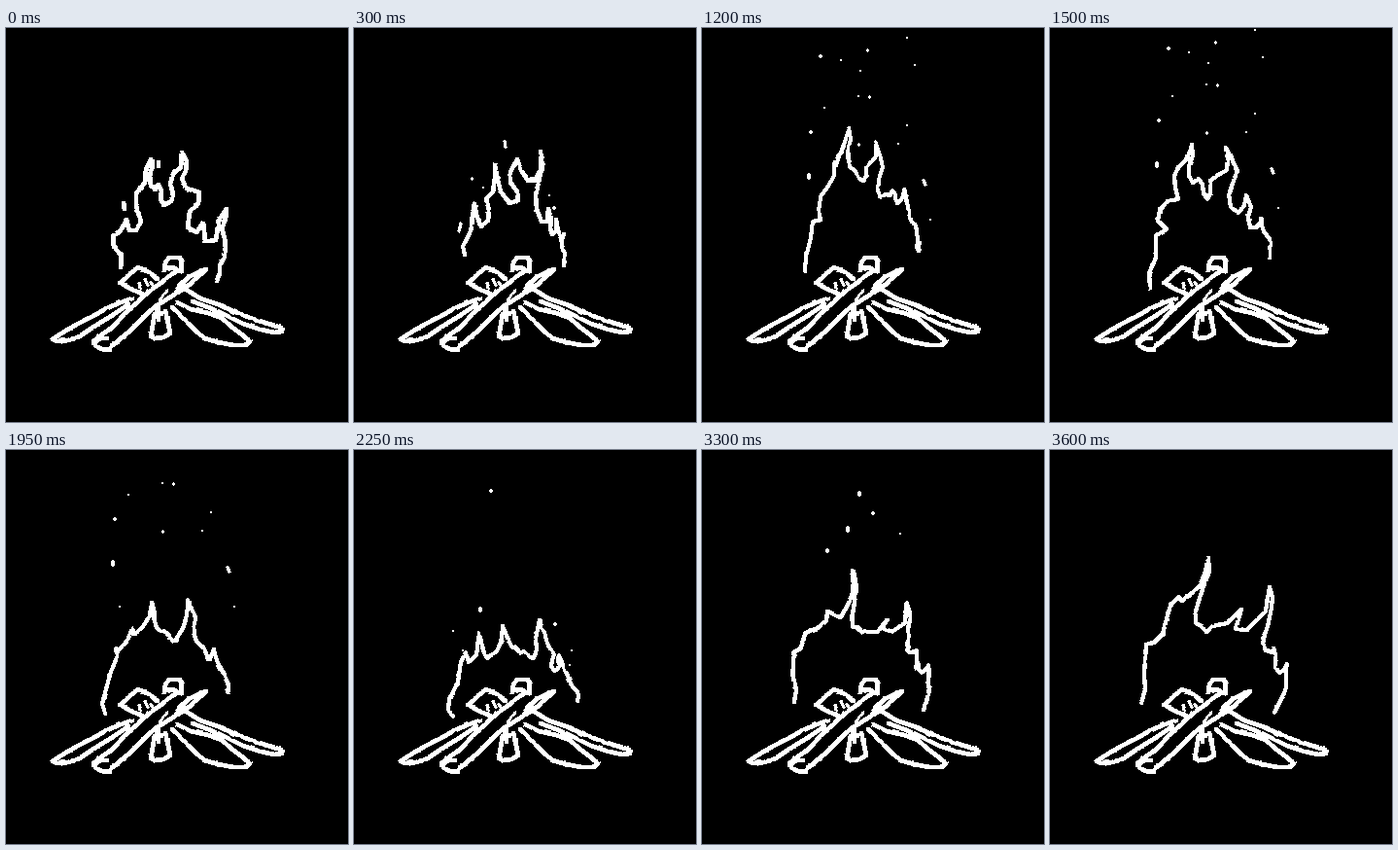
Write an HTML page without scripts that moves like this. It is 352x405 px and loops after 3.75 s.

```html
<!DOCTYPE html>
<html lang="en">
<head>
<meta charset="utf-8">
<title>Campfire</title>
<style>
html, body { margin: 0; width: 100%; height: 100%; overflow: hidden; background: #000; }
svg { display: block; width: 100%; height: 100%; }
path {
  fill: none; stroke: #fff; stroke-width: 4.8;
  stroke-linecap: round; stroke-linejoin: round; shape-rendering: crispEdges;
}
.thin { stroke-width: 3.2; }

/* 25 drawings of 150 ms each: one drawing is 4% of the loop */
.flame { animation: flame 3750ms infinite; }
.sparks { visibility: hidden; animation: 3750ms step-end infinite; }
.s0 { animation-name: s0; }
.s1 { animation-name: s1; }
.s2 { animation-name: s2; }
.s3 { animation-name: s3; }
.s3b { animation-name: s3b; }
.s4 { animation-name: s4; }
.s5 { animation-name: s5; }
.s6 { animation-name: s6; }

/* Each pose: base to first tip, second tip, third tip, right base */
@keyframes flame {
  0% {
    animation-timing-function: steps(2); stroke-width: 4.8px;
    d: path("M118,246 119,234 111,225 110,214 118,208 124,198 127,208 135,208 139,199 134,183 134,170 143,159 144,146 149,135 151,141 148,152 149,162 154,166 157,161 160,168 159,176 163,182 170,178 172,170 169,160 172,150 180,143 181,128 186,137 185,147 181,155 186,165 199,169 198,180 189,189 187,205 196,210 203,200 205,219 216,218 219,198 227,186 226,196 222,206 225,216 226,226 224,237 220,244 220,252 217,260");
  }
  8% {
    animation-timing-function: steps(4); stroke-width: 4.6px;
    d: path("M114,233 112,225 118,213 121,205 122,192 124,181 127,196 131,204 138,198 139,187 136,176 143,168 145,154 145,141 148,156 151,168 156,175 161,180 169,177 168,168 161,159 161,148 168,135 172,146 179,157 187,156 192,145 192,127 194,144 190,158 187,172 188,186 193,199 199,199 200,186 203,196 202,206 204,212 208,209 208,197 210,208 213,218 216,212 214,217 214,222 215,228 217,232 217,236 217,239 216,242 216,244");
  }
  24% {
    animation-timing-function: steps(4); stroke-width: 3.9px;
    d: path("M109,234 112,218 114,200 119,185 124,188 129,178 132,158 137,150 139,130 144,112 148,131 151,118 153,100 156,86 159,98 158,108 158,118 158,128 160,136 163,141 168,142 171,138 173,133 174,128 175,124 175,120 176,116 176,112 178,124 179,138 176,153 178,162 181,164 184,152 187,163 190,162 190,157 194,158 197,155 198,149 198,143 199,136 203,150 205,163 205,178 208,186 213,182 216,193 219,206 219,222");
  }
  40% {
    animation-timing-function: steps(5); stroke-width: 4.3px;
    d: path("M103,267 102,252 109,236 109,213 120,207 111,198 113,187 121,178 132,176 129,164 128,152 132,143 141,135 146,120 147,131 143,142 143,152 147,159 153,155 157,161 158,170 162,176 165,170 165,157 173,151 182,146 183,135 181,123 187,134 193,147 188,159 184,172 186,184 194,190 200,182 202,172 207,184 204,194 206,205 212,205 216,201 218,196 218,203 220,209 223,213 226,217 227,222 226,227 226,232 226,236");
  }
  60% {
    animation-timing-function: steps(4); stroke-width: 4.2px;
    d: path("M102,274 97,267 98,256 107,239 110,218 115,208 118,218 126,211 129,188 133,206 137,214 147,207 152,195 153,181 156,188 159,196 163,203 166,203 169,207 172,208 175,207 178,210 181,213 185,214 188,205 187,194 189,184 191,175 193,181 196,188 198,195 200,201 203,206 206,210 204,216 203,222 206,227 209,226 211,222 210,218 210,214 211,211 214,218 217,226 220,232 223,240 226,245 230,248 231,253 230,258");
  }
  76% {
    animation-timing-function: steps(5); stroke-width: 4.7px;
    d: path("M96,258 96,247 88,234 88,220 94,212 92,187 101,204 111,218 122,212 119,182 137,210 144,190 150,175 145,145 151,155 157,164 160,172 161,180 163,187 167,184 171,188 173,196 179,200 180,191 177,181 183,190 189,197 187,181 190,187 193,194 191,201 195,207 197,214 200,215 201,211 203,207 205,210 205,216 206,224 210,229 214,226 217,224 219,229 219,235 217,240 220,245 223,250 223,255 224,259 224,263");
  }
  96%, 100% {
    animation-timing-function: step-end; stroke-width: 4.3px;
    d: path("M94,260 98,246 97,230 99,200 107,198 116,189 120,173 124,160 132,151 136,155 146,147 153,141 159,128 163,111 164,125 159,138 154,152 150,166 150,178 156,181 161,187 168,181 182,178 197,164 191,184 203,185 222,165 226,141 229,152 228,162 226,172 224,181 221,190 219,199 222,206 228,208 231,204 232,214 232,223 236,229 241,226 244,220 243,226 243,232 243,239 243,245 240,252 237,258 234,264 231,270");
  }
}

/* Sparks tear off, drift up and go out */
@keyframes s0 {
  0% { visibility: visible; transform: none; }
  4% { transform: translateY(-10px); }
  8% { visibility: hidden; }
}
@keyframes s1 {
  8% { visibility: visible; transform: none; }
  12% { transform: translateY(-22px); }
  16% { visibility: hidden; }
}
@keyframes s2 {
  16% { visibility: visible; transform: translateY(11px); }
  20% { transform: translateY(4px); }
  24% { transform: none; }
  28% { transform: translateY(-30px); }
  32% { visibility: hidden; }
}
@keyframes s3 {
  32% { visibility: visible; transform: translateY(8px); }
  36% { transform: translateY(4px); }
  40% { transform: none; }
  44% { transform: translateY(-4px); }
  48% { visibility: hidden; }
}
@keyframes s3b {
  32% { visibility: visible; transform: translateY(12px); }
  36% { transform: translateY(6px); }
  40% { transform: none; }
  44% { transform: translateY(-8px); }
  48% { transform: translateY(-16px); }
  52% { transform: translateY(-24px); }
  56% { transform: translateY(-30px); }
  60% { visibility: hidden; }
}
@keyframes s4 {
  56% { visibility: visible; transform: translateY(8px); }
  60% { transform: none; }
  64% { visibility: hidden; }
}
@keyframes s5 {
  72% { visibility: visible; transform: translateY(10px); }
  76% { transform: none; }
  80% { transform: translateY(-14px); }
  84% { visibility: hidden; }
}
@keyframes s6 {
  84% { visibility: visible; transform: none; }
  88% { transform: translateY(-18px); }
  92% { transform: translateY(-34px); }
  96% { visibility: hidden; }
}
</style>
</head>
<body>
<svg viewBox="0 0 352 405">
  <defs>
    <filter id="rough" filterUnits="userSpaceOnUse" x="0" y="0" width="352" height="405" color-interpolation-filters="sRGB">
      <feTurbulence type="fractalNoise" baseFrequency=".14" numOctaves="2" seed="4"/>
      <feDisplacementMap in="SourceGraphic" scale="2.5" xChannelSelector="R" yChannelSelector="G"/>
    </filter>
  </defs>

  <g filter="url(#rough)">
    <!-- left log -->
    <path d="M130,278 118,282 104,288 88,297 74,304 60,312 48,320 53,322 64,321 74,318 92,306 110,295 126,284"/>
    <!-- front log -->
    <path d="M104,319 97,319 91,321 92,326 98,330 106,331 110,326 128,311 146,293 154,286 175,273 190,263 206,248 198,251 188,256 178,265M95,318 110,307 124,292 148,270 161,261 172,252 181,250"/>
    <!-- short log and back log -->
    <path d="M156,258 147,251 136,246 127,253 118,262 128,268 140,273M163,249 164,241 168,236 178,236 181,241 180,250M166,247 172,246 177,249"/>
    <path class="thin" d="M137,262 139,267M143,259 146,264M149,262 151,264M146,270 151,268M158,280 166,270M176,268 184,262"/>
    <!-- middle log -->
    <path d="M153,294 151,306 149,317 154,319 162,318 169,314 167,304 164,291M156,288 157,300M152,296 162,293"/>
    <!-- right logs -->
    <path d="M171,287 182,298 194,310 204,319 218,323 234,326 247,326 251,322 244,316 232,307 222,298 208,293 190,289 176,282"/>
    <path d="M184,268 200,278 218,284 236,292 254,299 270,304 283,308 284,312 276,313 262,310 244,304 226,295 208,287 192,281"/>
    <path class="flame"/>
  </g>

  <path class="sparks s0" d="M121,180 122,186M157,138v4"/>
  <path class="sparks s1 thin" d="M155,116 156,123M121,155h1M133,164h0M110,201 108,209M201,172h0M206,184v2"/>
  <path class="sparks s2 thin" d="M187,39h0M205,40h0M177,66v2M186,72v2M235,64 234,67M143,72h0M125,84v3M216,102 213,115M165,101h0M117,167v2M124,172h0M233,202 231,211"/>
  <path class="sparks s3 thin" d="M121,21h2M170,15h1M211,2h0M143,25h0M219,30h0M163,36h0"/>
  <path class="sparks s3b thin" d="M161,58h0M172,59h1M126,70h0M111,95h2M211,88h0M161,108h1M202,107h0M110,138v5M228,145 230,149M235,185h0M117,185h0"/>
  <path class="sparks s4 thin" d="M141,41v2M130,162v4M102,186h0M207,178v2M224,206h0M112,206h0M222,221h0"/>
  <path class="sparks s5" d="M102,172 104,177M179,164h2"/>
  <path class="sparks s6 thin" d="M162,61v4M176,82v2M150,97v5M204,104h0M129,120v3"/>
</svg>
</body>
</html>
```
